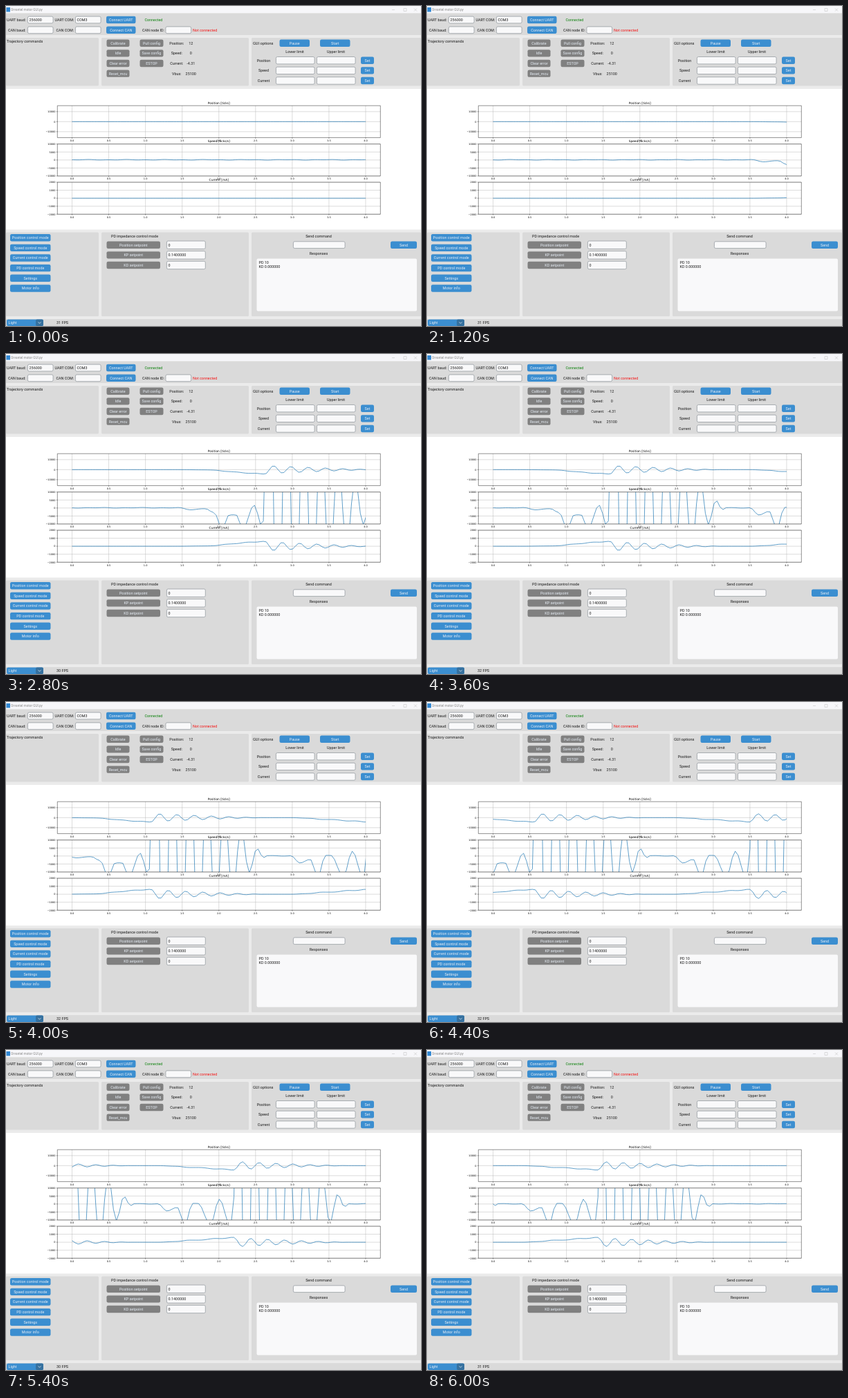
An HTML page that plays this animation: 600 by 463 pixels, repeating every 6.1 s.

```html
<!DOCTYPE html>
<html lang="en">
<head>
<meta charset="utf-8">
<title>Motor GUI</title>
<style>
  html, body { margin: 0; width: 100%; height: 100%; overflow: hidden; background: #ebebeb; }
  svg { display: block; width: 600px; height: 463px; }
  text { font: 5.4px Roboto, Arial, sans-serif; fill: #1a1a1a; white-space: pre; }
  .plot text { font-family: "DejaVu Sans", sans-serif; font-size: 3.5px; fill: #000; }
  .plot .head { font-size: 4.36px; }
</style>
</head>
<body>
<svg id="stage" viewBox="0 0 600 463" xmlns="http://www.w3.org/2000/svg"></svg>
<script>
const NS = "http://www.w3.org/2000/svg";
const stage = document.getElementById("stage");
const BLUE = "#3b8ed0", GREY = "#808080", PANEL = "#dadada", ROW = 14.65;

function add(tag, attrs, parent = stage) {
  const el = document.createElementNS(NS, tag);
  for (const k in attrs) el.setAttribute(k, attrs[k]);
  parent.appendChild(el);
  return el;
}

const box = (x, y, w, h, fill, rx = 0, more = {}) =>
  add("rect", { x, y, width: w, height: h, fill, rx, ...more });

// y is the vertical middle of the text
function label(s, x, y, anchor = "start", fill = "#1a1a1a", size = 5.4, parent = stage) {
  const el = add("text", { x, y: y + size * 0.36, "text-anchor": anchor }, parent);
  el.style.fill = fill;
  if (parent === stage) el.style.fontSize = size + "px";
  el.textContent = s;
  return el;
}

function button(s, x1, x2, y, fill = BLUE) {
  box(x1, y - 5.2, x2 - x1, 10.4, fill, 2.2);
  label(s, (x1 + x2) / 2, y, "middle", "#e6edf5");
}

function entry(x1, x2, y, s = "", h = 9.8) {
  box(x1 + 0.4, y - h / 2, x2 - x1 - 0.8, h, "#f9f9fa", 2, { stroke: "#979da2", "stroke-width": 0.8 });
  if (s) label(s, x1 + 2.6, y);
}

const column = (names, x1, x2, y, fill) =>
  names.forEach((s, i) => button(s, x1, x2, y + i * ROW, fill));

// ---- window and panels ----
box(0, 0, 600, 463, "#ebebeb");
box(0, 0, 600, 10.5, "#f7f7fa");
box(0.5, 2, 5.5, 6.5, "#2f86d2");
label("Orvantel motor GUI.py", 7, 5.4, "start", "#888", 4.7);
add("path", { d: "M558 5.5h4M575 3.5h4v4h-4zM590 3.5l4 4m0-4l-4 4", fill: "none", stroke: "#bbb", "stroke-width": 0.5 });
box(0, 10.5, 600, 31.5, PANEL);
for (const [y, h] of [[46, 69.5], [327.5, 121.5]])
  for (const [x, w] of [[0, 134], [138, 213], [355, 245]]) box(x, y, w, h, PANEL, 1.5);
box(0, 120, 600, 203.5, "#fff");
box(0, 453, 600, 10, PANEL);

// ---- connection rows ----
["UART", "CAN"].forEach((bus, i) => {
  const y = 20 + i * 14.8;
  label(bus + " baud:", 1 + i * 2, y);
  entry(31, 68.5, y, i ? "" : "256000");
  label(bus + " COM:", 70.5 + i * 2, y);
  entry(100, 137.5, y, i ? "" : "COM3");
  button("Connect " + bus, 145, 187.5, y);
});
label("Connected", 200.5, 20, "start", "#0a800a");
label("CAN node ID:", 197, 34.8);
entry(230.5, 268, 34.8);
label("Not connected", 270, 34.8, "start", "#f51414");

// ---- upper panels ----
label("Trajectory commands", 1, 51.5);
column(["Calibrate", "Idle", "Clear error", "Reset_mcu"], 145.5, 178.5, 53.7, GREY);
column(["Pull config", "Save config", "ESTOP"], 193.5, 227.5, 53.7, GREY);
[["Position:", "12"], ["Speed:", "0"], ["Current:", "-4.31"], ["Vbus:", "25100"]].forEach(([s, v], i) => {
  label(s, 246.8, 53.7 + i * ROW, "middle");
  label(v, 267.2, 53.7 + i * ROW, "middle");
});
label("GUI options", 357, 53.5, "start", "#1a1a1a", 5.7);
button("Pause", 395.5, 439, 53.7);
button("Start", 454, 497.5, 53.7);
label("Lower limit", 417.5, 66.2, "middle");
label("Upper limit", 477, 66.2, "middle");
["Position", "Speed", "Current"].forEach((s, i) => {
  const y = 78.7 + i * ROW;
  label(s, 372.5, y, "middle");
  entry(390, 446.5, y, "", 10.4);
  entry(449, 505.5, y, "", 10.4);
  button("Set", 513, 532, y);
});

// ---- lower panels ----
column(["Position control mode", "Speed control mode", "Current control mode", "PD control mode", "Settings", "Motor info"],
  6, 64.5, 335.2);
label("PD impedance control mode", 152, 333);
column(["Position setpoint", "KP setpoint", "KD setpoint"], 145.5, 223, 345.7, GREY);
["0", "0.1400000", "0"].forEach((v, i) => entry(232, 288.7, 345.7 + i * ROW, v, 11.4));
label("Send command", 452, 333, "middle");
entry(415, 490.5, 345.7);
button("Send", 556, 594, 345.7);
label("Responses", 452, 358.2, "middle");
box(362.5, 365.5, 231.5, 76, "#f9f9fa", 2);
label("PD 10", 365.5, 371.3);
label("KD 0.000000", 365.5, 377.4);

// ---- status bar ----
box(1, 453.5, 53, 9.5, BLUE, 2);
box(43, 453.5, 11, 9.5, "#36719f", 2);
label("Light", 3.5, 458.3, "start", "#e6edf5");
add("path", { d: "M46.6 457.4l1.9 1.9 1.9-1.9", fill: "none", stroke: "#e6edf5", "stroke-width": 0.8 });
const fps = label("", 73, 458.3);

// ---- motor model: the shaft is pulled aside by hand, let go and swings out ----
// u runs along the strip in px; position in kiloticks, speed in kiloticks/s
const SAMPLE = 4.25, PX_PER_S = 125, SWING = 165, KP = 0.14;

// pull: [px before release, speed]
const events = [
  { at: 594, half: 12.5, pull: [[-126, 0], [-108, -1.2], [-86, -.5], [-74, -3], [-62, -13], [-52, -4.4],
    [-42, -4.4], [-32, -13], [-16, 1.5], [-4, -12], [0, 0]] },
  { at: 906, half: 12.2, pull: [[-110, 0], [-97, -4.5], [-82, -2.4], [-71, -13], [-60, .3],
    [-52, .2], [-34, -13], [-21, 2.8], [-5, -14], [0, 0]] }
];

function pullSpeed({ pull }, s) {
  const i = pull.findIndex(([k]) => k >= s);
  if (i < 1) return 0;
  const [a, va] = pull[i - 1], [b, vb] = pull[i];
  return va + (vb - va) * (1 - Math.cos(Math.PI * (s - a) / (b - a))) / 2;
}

const swing = (e, s) => s >= SWING ? 0 : (1 - s / SWING) ** 1.3 * Math.cos(Math.PI * s / e.half);
const ripple = u => 0.15 + 0.2 * Math.sin(u * 0.17) * Math.sin(u * 0.061 + 1);

function simulate() {
  const pos = [], speed = [];
  let p = 0, depth = 0;
  for (let u = -80; u < 1200; u += SAMPLE) {
    const e = events.find(e => u < e.at + SWING) || events[1];
    const s = u - e.at;
    let v;
    if (s < 0) {
      v = pullSpeed(e, s);
      p += v * SAMPLE / PX_PER_S;
      depth = p;
    } else {
      p = depth * swing(e, s);
      v = depth * (swing(e, s + 0.5) - swing(e, s - 0.5)) * PX_PER_S;
    }
    pos.push([u, p]);
    speed.push([u, v + ripple(u)]);
  }
  return { pos, speed, current: pos.map(([u, v]) => [u, -KP * v]) };
}
const { pos, speed, current } = simulate();

// ---- plots ----
const plot = add("g", { class: "plot" });
const X0 = 95.5, DX = 53.06, LEFT = 74.3, RIGHT = 541.3, HEIGHT = 46.25;
const charts = [
  { head: "Position [ticks]", top: 144.2, px: 1.45, step: 10, n: 1, data: pos },
  { head: "Speed [ticks/s]", top: 199.7, px: 2.315, step: 5, n: 2, data: speed },
  { head: "Current [mA]", top: 255, px: 11.575, step: 1, n: 2, data: current }
];
const defs = add("defs", {});

const strips = charts.map((c, k) => {
  const bottom = c.top + HEIGHT, zero = c.top + HEIGHT / 2;
  const clip = add("clipPath", { id: "clip" + k }, defs);
  add("rect", { x: X0, y: c.top, width: 8 * DX, height: HEIGHT }, clip);
  let grid = "", marks = "";
  for (let i = 0; i < 9; i++) {
    const x = X0 + i * DX;
    grid += `M${x} ${c.top}V${bottom}`;
    marks += `M${x} ${bottom}v1.4`;
    label((i / 2).toFixed(1), x, bottom + 4.2, "middle", "#000", 3.5, plot);
  }
  for (let i = -c.n; i <= c.n; i++) {
    const v = i * c.step, y = zero - v * c.px;
    grid += `M${LEFT} ${y}H${RIGHT}`;
    marks += `M${LEFT} ${y}h-1.4`;
    label(String(v * 1000).replace("-", "\u2212"), LEFT - 2.8, y, "end", "#000", 3.5, plot);
  }
  add("path", { d: grid, stroke: "#b0b0b0", "stroke-width": 0.45 }, plot);
  const view = add("g", { "clip-path": `url(#clip${k})` }, plot);
  const line = add("polyline", {
    points: c.data.map(([u, v]) => `${u},${(zero - v * c.px).toFixed(2)}`).join(" "),
    fill: "none", stroke: "#1f77b4", "stroke-width": 0.7, "stroke-linejoin": "round"
  }, view);
  add("path", {
    d: `${marks}M${LEFT} ${c.top}H${RIGHT}V${bottom}H${LEFT}Z`,
    fill: "none", stroke: "#222", "stroke-width": 0.5
  }, plot);
  label(c.head, 307.8, c.top - 3.8, "middle", "#000", 4.36, plot).setAttribute("class", "head");
  return line;
});

// ---- motion: steady scroll in steps, and the frame counter ----
const LOOP = 6100, STEP = 100, OFFSET = -165, RATE = 0.1373;
const rates = [[0, 31], [1800, 30], [3200, 32], [5300, 30], [5800, 31]];

const start = performance.now();
function draw() {
  const now = Math.max(0, performance.now() - start) % LOOP;
  const t = Math.floor(now / STEP) * STEP;
  const shift = `translate(${-(OFFSET + t * RATE)} 0)`;
  for (const s of strips) s.setAttribute("transform", shift);
  fps.textContent = rates.filter(([k]) => k <= t).pop()[1] + " FPS";
  requestAnimationFrame(draw);
}
draw();
</script>
</body>
</html>
```
